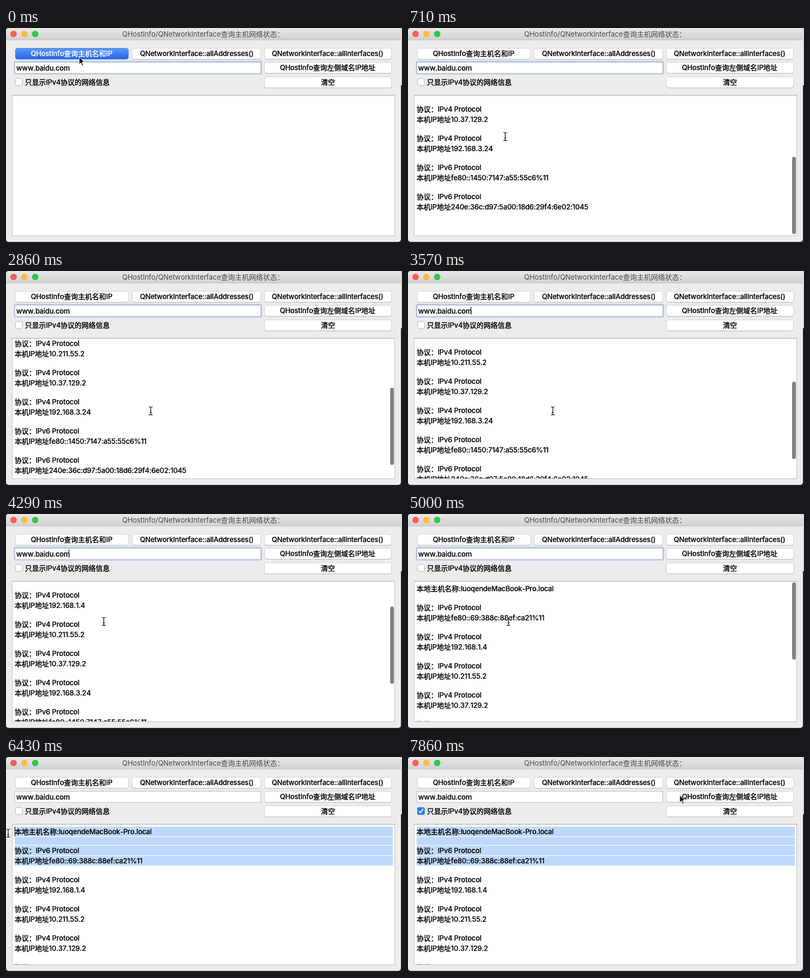
An HTML page that plays this animation: 733x398 px, repeating every 8 s.

```html
<!DOCTYPE html>
<html lang="zh-CN">
<head>
<meta charset="utf-8">
<style>
html, body { margin: 0; width: 100%; height: 100%; overflow: hidden; background: #1c2432; }
svg { display: block; width: 733px; height: 398px; }
text {
  font: 500 13px Inter, "Noto Sans CJK SC", "Noto Sans CJK JP", "Noto Sans CJK", sans-serif;
  font-kerning: none; letter-spacing: -0.2px; white-space: pre;
  color: #000; fill: currentColor; stroke: currentColor; stroke-width: 0.2px;
}
.han { letter-spacing: 0; stroke-width: 0.4px; }
.title { font-weight: 400; letter-spacing: -0.05px; color: #4a4a4a; }
.title, .title .han { stroke-width: 0; }
</style>
</head>
<body>
<svg id="stage" viewBox="0 0 733 398">
  <defs>
    <linearGradient id="bar" x2="0" y2="1"><stop stop-color="#e8e8e8"/><stop offset="1" stop-color="#d2d2d2"/></linearGradient>
    <linearGradient id="press" x2="0" y2="1"><stop stop-color="#5a9bf8"/><stop offset="1" stop-color="#2762ea"/></linearGradient>
    <clipPath id="view"><rect x="12" y="125" width="707" height="259"/></clipPath>
    <clipPath id="frame"><rect width="731" height="396" rx="5"/></clipPath>
  </defs>
  <rect x="725" width="8" height="106" fill="#d3d6da"/>
  <g clip-path="url(#frame)">
    <rect width="731" height="396" fill="#ececec"/>
    <rect width="731" height="22" fill="url(#bar)"/>
    <rect y="21.5" width="731" height="1" fill="#bdbdbd"/>
  </g>
  <g id="chrome"></g>
  <g clip-path="url(#view)">
    <g id="page"></g>
    <rect id="thumb" x="711" width="7" height="143" rx="3.5" fill="#818181"/>
  </g>
  <g id="arrow"><path d="M.5.5V14.3L3.7 11.3 5.9 16.8 8.1 15.9 5.8 10.5H10.1Z" fill="#000" stroke="#fff" stroke-width="1"/></g>
  <g id="beam" fill="none" stroke-linecap="round">
    <path d="M-3-7.5Q0-7.5 0-5.5Q0-7.5 3-7.5M0-5.5V5.5M-3 7.5Q0 7.5 0 5.5Q0 7.5 3 7.5M-1.5 2.5H1.5" stroke="#fff" stroke-width="2.6"/>
    <path d="M-3-7.5Q0-7.5 0-5.5Q0-7.5 3-7.5M0-5.5V5.5M-3 7.5Q0 7.5 0 5.5Q0 7.5 3 7.5M-1.5 2.5H1.5" stroke="#000" stroke-width="1.2"/>
  </g>
</svg>
<script>
const LOOP = 8000;
const $ = id => document.getElementById(id);
const chrome = $('chrome'), page = $('page');

function add(parent, tag, attrs, content) {
  const el = document.createElementNS('http://www.w3.org/2000/svg', tag);
  for (const key in attrs) el.setAttribute(key, attrs[key]);
  if (content) el.textContent = content;
  parent.appendChild(el);
  return el;
}
const box = (parent, x, y, width, height, fill, more) =>
  add(parent, 'rect', { x, y, width, height, fill, ...more });
const show = (el, on) => el.setAttribute('display', on ? 'inline' : 'none');

// Latin and Han runs are set with their own spacing.
function label(parent, x, middle, content, more) {
  const text = add(parent, 'text', { x, y: middle + 4.7, ...more });
  for (const run of content.match(/[ -~]+|[^ -~]+/g))
    add(text, 'tspan', run[0] > '~' ? { class: 'han' } : {}, run);
  return text;
}

// Window controls and title
['#fc5b57', '#fdbb3f', '#34c648'].forEach((fill, i) =>
  add(chrome, 'circle', { cx: 14 + 20 * i, cy: 11, r: 6, fill }));
label(chrome, 215, 11.5, 'QHostInfo/QNetworkInterface查询主机网络状态：', { class: 'title' });

// Buttons
function button(x, y, width, textX, content) {
  box(chrome, x + 0.5, y + 1, width - 1, 20.5, '#bcbcbc', { rx: 4 });
  const face = box(chrome, x + 0.5, y + 0.5, width - 1, 20, '#fff', { rx: 4, stroke: '#cdcdcd', 'stroke-width': 0.8 });
  return { face, text: label(chrome, textX, y + 10.5, content) };
}
const hostButton = button(17, 37, 210, 46, 'QHostInfo查询主机名和IP');
button(233, 37, 239, 248, 'QNetworkInterface::allAddresses()');
button(478, 37, 236, 492, 'QNetworkInterface::allInterfaces()');
button(478, 63, 236, 507, 'QHostInfo查询左侧域名IP地址');
button(478, 90, 236, 583, '清空');

// Address field
const ring = add(chrome, 'g', {});
box(ring, 14, 60.5, 460.5, 26, '#d3ddf0', { rx: 3 });
box(ring, 15, 61.5, 458.5, 24, '#b0c4ec', { rx: 2 });
box(chrome, 16.5, 63.5, 455, 20.5, '#fff', { stroke: '#b9c0cc', 'stroke-width': 1 });
label(chrome, 19, 74, 'www.baidu.com');
const fieldCaret = box(chrome, 116, 66, 1, 15, '#000');

// Checkbox
box(chrome, 17.5, 93.5, 13, 13, '#fff', { rx: 3, stroke: '#b9b9b9' });
const check = add(chrome, 'g', {});
box(check, 17, 93, 14, 14, '#2f7cf6', { rx: 3 });
add(check, 'path', { d: 'M20.5 100.3L23 103.3L27.6 96.6', fill: 'none', stroke: '#fff', 'stroke-width': 1.9, 'stroke-linecap': 'round', 'stroke-linejoin': 'round' });
label(chrome, 35, 100, '只显示IPv4协议的网络信息');

// Output area
box(chrome, 11.5, 124.5, 708, 260, '#fff', { stroke: '#c3c3c3' });
box(chrome, 11, 124, 709, 1, '#a2a2a2');

const addresses = [
  'fe80::69:388c:88ef:ca21%11', '192.168.1.4', '10.211.55.2', '10.37.129.2', '192.168.3.24',
  'fe80::1450:7147:a55:55c6%11', '240e:36c:d97:5a00:18d6:29f4:6e02:1045'
];
const lines = ['本地主机名称:luoqendeMacBook-Pro.local'];
for (const ip of addresses)
  lines.push('', `协议：IPv${ip.includes(':') ? 6 : 4} Protocol`, '本机IP地址' + ip);

const tops = [];
lines.reduce((y, line) => (tops.push(y), y + (line ? 19 : 16)), 129);

const tailMark = box(page, 255, 183, 461, 18, '#bfd9fe');
const fullMark = add(page, 'g', {});
for (let i = 0; i < 4; i++) box(fullMark, 16, tops[i], 700, lines[i] ? 18 : 15, '#bfd9fe');
lines.forEach((line, i) => line && label(page, 16, tops[i] + 9, line));
const endCaret = box(page, 254, 183, 1, 18, '#000');
const startCaret = box(page, 16, 129, 1, 18, '#000');

// Stepped tracks: [time, ...values]
const topLine = [[0, 0], [360, 10], [1070, 7], [2140, 8], [3220, 10], [3570, 7], [3930, 4], [4640, 2], [5000, 0]];
const blink = [[0, 0], [360, 1], [710, 0], [1430, 1], [1780, 0], [2500, 1], [2860, 0],
  [3220, 1], [3930, 0], [4290, 1], [5000, 0], [5360, 1], [5720, 0]];
const pointer = [
  [0, 'arrow', 135, 53], [360, 'beam', 160, 150], [710, 'beam', 180, 201], [1780, 'beam', 268, 259],
  [3930, 'beam', 194, 213], [4290, 'beam', 181, 199], [5000, 'beam', 186, 199], [5360, 'beam', 225, 203],
  [5720, 'beam', 283, 206], [6080, 'beam', 237, 192], [6430, 'beam', 4, 141], [6790, 'arrow', 8, 116],
  [7150, 'arrow', 26, 105], [7510, 'arrow', 108, 91], [7860, 'arrow', 502.5, 70]
];
const at = (track, t) => track.findLast(step => step[0] <= t).slice(1);

function draw(t) {
  const filled = t >= 360;
  hostButton.face.setAttribute('fill', filled ? '#fff' : 'url(#press)');
  hostButton.face.setAttribute('stroke', filled ? '#cdcdcd' : '#3b73e6');
  hostButton.text.style.color = filled ? '#000' : '#fff';

  const [first] = at(topLine, t);
  show(page, filled);
  page.setAttribute('transform', `translate(0 ${first ? 125 - tops[first] : 0})`);
  show($('thumb'), filled && t < 5360);
  $('thumb').setAttribute('y', 126.5 + 11.2 * first);

  show(fieldCaret, at(blink, t)[0]);
  show(ring, t < 6080);
  show(tailMark, t >= 6080 && t < 6430);
  show(endCaret, t >= 6080 && t < 6430);
  show(fullMark, t >= 6430);
  show(startCaret, t >= 6430 && t < 6790);
  show(check, t >= 7510);

  const [kind, x, y] = at(pointer, t);
  for (const id of ['arrow', 'beam']) show($(id), id === kind);
  $(kind).setAttribute('transform', `translate(${x} ${y})`);
}

const start = performance.now();
function tick() {
  draw((performance.now() - start) % LOOP);
  requestAnimationFrame(tick);
}
draw(0);
requestAnimationFrame(tick);
</script>
</body>
</html>
```
